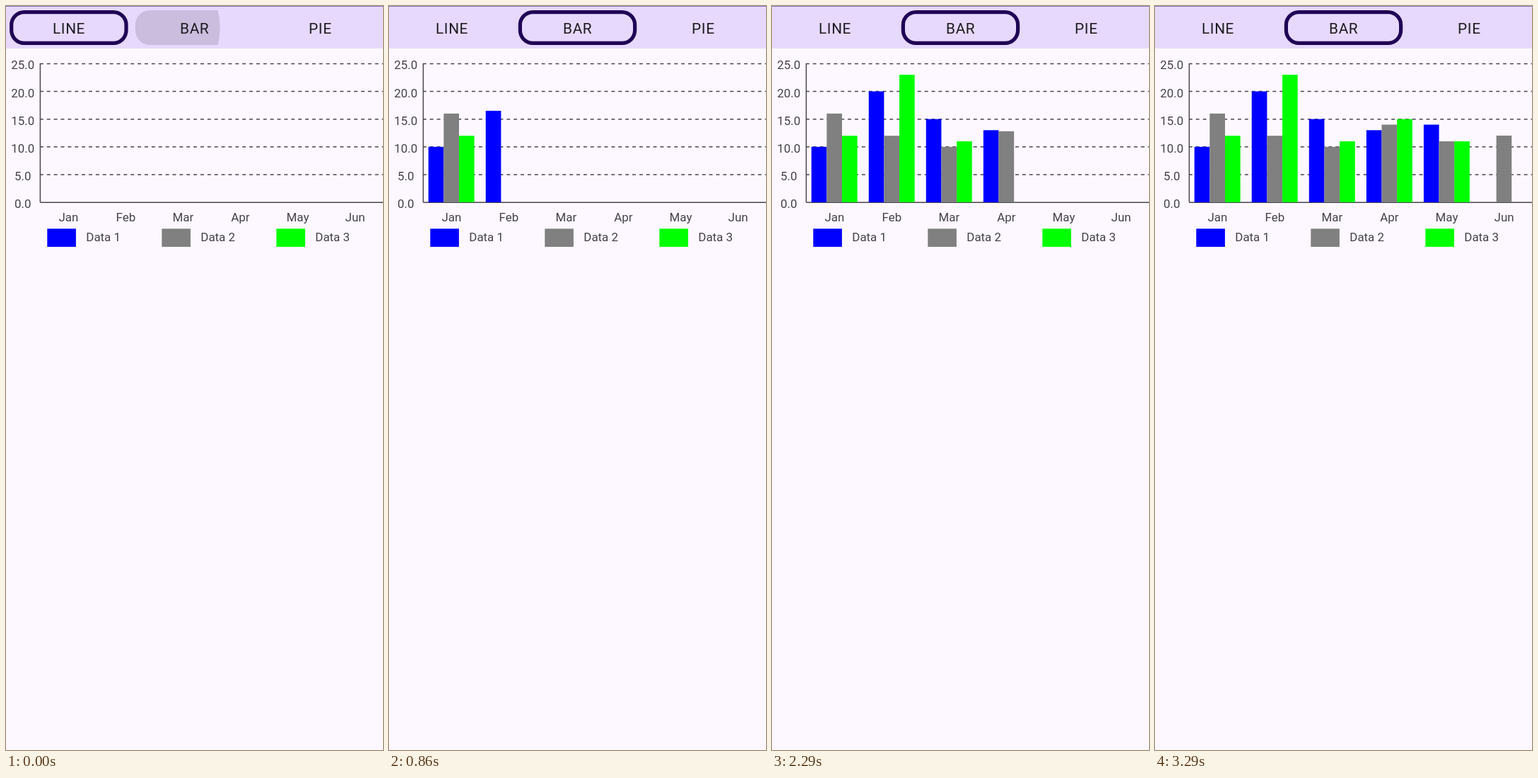
An HTML page that plays this animation: 533 by 1050 pixels, repeating every 3.44 s.

```html
<!DOCTYPE html>
<html lang="en">
<head>
<meta charset="utf-8">
<title>Bar chart</title>
<style>
  html, body { margin: 0; width: 100%; height: 100%; overflow: hidden; background: #fdf8ff; }
  svg { display: block; width: 100%; height: 100%; }
  text { font-family: Roboto, "Open Sans", sans-serif; font-size: 16.9px; fill: #454149; }
  .tab { font-size: 20.8px; letter-spacing: .65px; fill: #1d1b20; }
  .mid { text-anchor: middle; }
  .rule { stroke: #49454f; stroke-width: 1.5; }
  .dash { stroke-dasharray: 4.935; }
</style>
</head>
<body>
<svg id="stage" viewBox="0 0 533 1050" preserveAspectRatio="none"></svg>
<script>
const LOOP = 3440, FPS = 7, GROW = 200;
const BASE = 277, UNIT = 7.825, LEFT = 48.4, PITCH = 81.05, BAR_W = 21.65;
const TAB_W = 533 / 3, TAB_PAD = 5.1, RING = 5.2;
const COLORS = ['#0000ff', '#808080', '#00ff00'];
const MONTHS = ['Jan', 'Feb', 'Mar', 'Apr', 'May', 'Jun'];
const VALUES = [[10, 16, 12], [20, 12, 23], [15, 10, 11], [13, 14, 15], [14, 11, 11], [0, 13, 0]];
// When each bar starts to grow, in ms
const STARTS = [
  [80, 280, 485], [695, 910, 1125], [1310, 1500, 1678],
  [1890, 2107, 2305], [2500, 2695, 2900], [3105, 3105, 3305]
];
const stage = document.getElementById('stage');

function add(tag, attrs, parent = stage) {
  const el = document.createElementNS('http://www.w3.org/2000/svg', tag);
  set(el, attrs);
  return parent.appendChild(el);
}
function set(el, attrs) {
  for (const name in attrs) el.setAttribute(name, attrs[name]);
}
function label(text, x, y, cls = 'mid') {
  add('text', { x, y, class: cls }).textContent = text;
}
function rule(x1, y1, x2, y2, extra = '') {
  add('line', { x1, y1, x2, y2, class: 'rule ' + extra });
}
const clamp = v => Math.max(0, Math.min(1, v));

// Cubic bezier (.4, 0, .2, 1), solved by bisection
function ease(x) {
  let lo = 0, hi = 1;
  for (let i = 0; i < 24; i++) {
    const s = (lo + hi) / 2, r = 1 - s;
    if (1.2 * r * r * s + .6 * r * s * s + s * s * s < x) lo = s; else hi = s;
  }
  return lo * lo * (3 - 2 * lo);
}

// Tab row
add('rect', { width: 533, height: 60, fill: '#e6d9fd' });
add('rect', { width: 533, height: 1, fill: '#8672c4' });
const clip = add('clipPath', { id: 'tab' });
add('rect', { x: TAB_W + TAB_PAD, y: 6, width: TAB_W - 2 * TAB_PAD, height: 49, rx: 20.7 }, clip);
const ripple = add('circle', { cy: 30.5, fill: '#1d1b20', 'clip-path': 'url(#tab)' });
const ring = add('rect', {
  y: 6 + RING / 2, width: TAB_W - 2 * TAB_PAD - RING, height: 49 - RING, rx: 18.1,
  fill: 'none', stroke: '#1f0055', 'stroke-width': RING
});
['LINE', 'BAR', 'PIE'].forEach((name, i) => label(name, (i + .5) * TAB_W + .2, 38.5, 'tab mid'));

// Chart frame, with the bars in front of the axes
for (let v = 0; v <= 25; v += 5) {
  const y = BASE - v * UNIT;
  if (v) rule(LEFT - .5, y, 533, y, 'dash');
  label(v.toFixed(1), 23.7, y + 8);
}
rule(LEFT, 81, LEFT, BASE);
rule(LEFT, BASE + .2, 533, BASE + .2);
const bars = VALUES.flatMap((row, m) => row.map((value, i) => ({
  value,
  start: STARTS[m][i],
  el: add('rect', { x: 55.7 + m * PITCH + i * BAR_W, width: BAR_W, fill: COLORS[i] })
})));
MONTHS.forEach((name, m) => label(name, 88.3 + m * PITCH, 304.2));
COLORS.forEach((fill, i) => {
  const x = 58.3 + i * 162;
  add('rect', { x, y: 314.3, width: 40.6, height: 25.6, fill });
  label('Data ' + (i + 1), x + 55, 331.6, '');
});

function draw(t) {
  const slide = ease(clamp((t - 60) / 250));
  set(ring, { x: TAB_PAD + RING / 2 + TAB_W * slide });

  const spread = clamp(t / 140);
  set(ripple, {
    cx: 201 + 65 * spread,
    r: 101.5 + 20 * spread,
    opacity: .14 * clamp((350 - t) / 150)
  });

  for (const { el, value, start } of bars) {
    const height = value * UNIT * clamp((t - start) / GROW);
    set(el, { y: BASE - height, height });
  }
}

// The screen refreshes in steps of 1/7 s
function tick() {
  const t = performance.now() % LOOP;
  const step = Math.min(23, Math.floor((t + 5) * FPS / 1000));
  draw(Math.round(step * 100 / FPS) * 10);
  requestAnimationFrame(tick);
}
tick();
</script>
</body>
</html>
```
